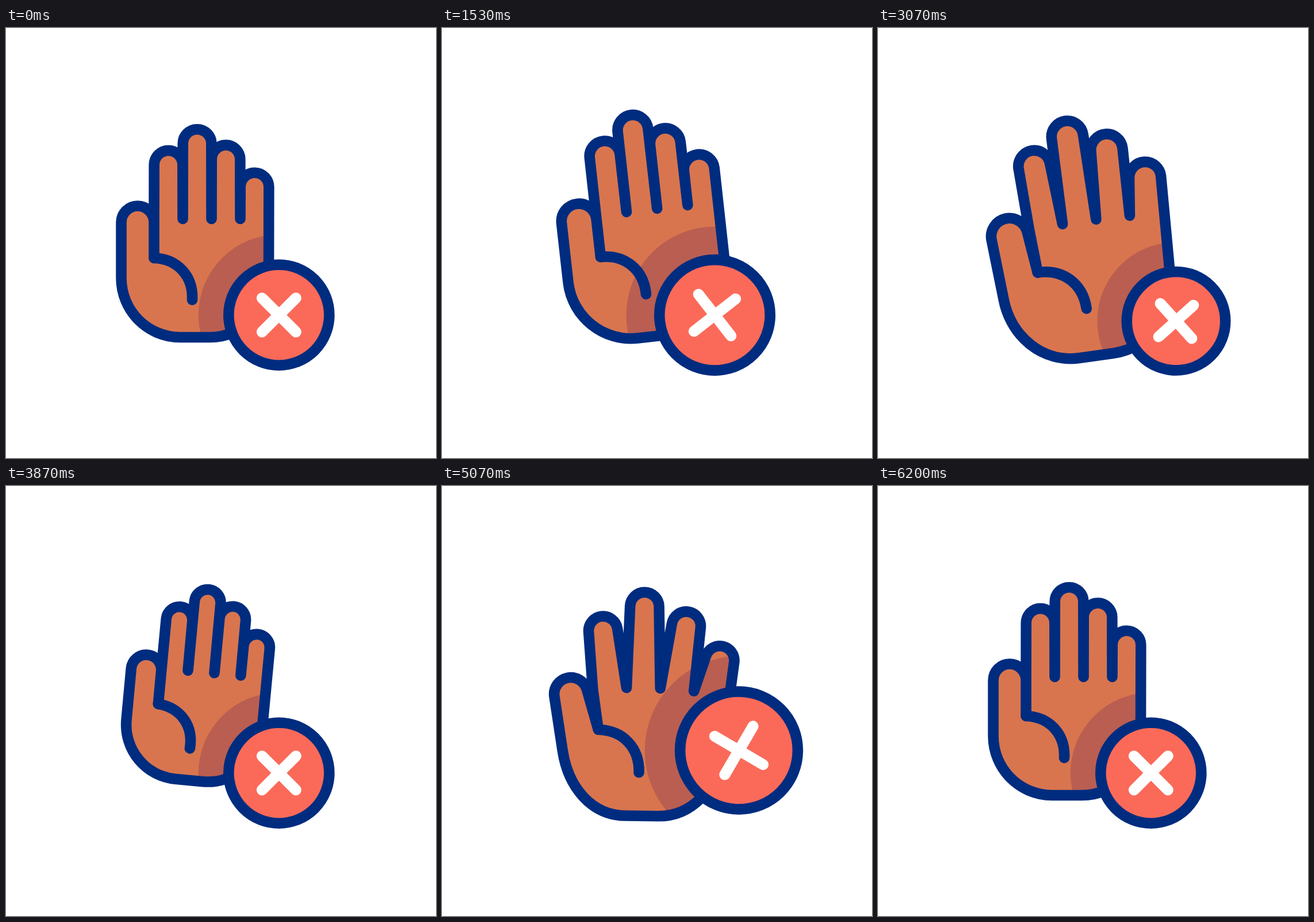
Write an HTML page that moves like this. It is 748 px wide and 748 px high and loops after 6270 ms.

```html
<!DOCTYPE html>
<html lang="en">
<head>
<meta charset="utf-8">
<title>Waving hand</title>
<style>
  html, body { margin: 0; width: 100%; height: 100%; overflow: hidden; background: #fff; }
  svg { display: block; width: 100vw; height: 100vh; }
  .line { fill: none; stroke: #002c7f; stroke-width: 18.6; stroke-linecap: round; stroke-linejoin: round; }
</style>
</head>
<body>
<svg viewBox="0 0 748 748">
  <clipPath id="palm"><path class="hand"/></clipPath>
  <path class="hand" fill="#d8754e"/>
  <circle id="shade" fill="#ba5e51" clip-path="url(#palm)"/>
  <path class="hand line"/>
  <path id="crease" class="line"/>
  <circle id="badge" class="line" style="fill:#fb6a59"/>
  <path id="cross" fill="none" stroke="#fff" stroke-width="19" stroke-linecap="round"/>
</svg>
<script>
const LOOP = 6270, CYCLE = LOOP / 3, FPS = 15, FRAMES = 94;

// Each pose: hand x, y, tilt, finger fan, size; badge x, y, size, turn.
const rest = [307.5, 332, 0, 0, 1, 474.8, 499.2, 1, 0];
const poses = [
  [0, rest],
  [330, [309, 358, 11, 9.5, 1.02, 494, 447, 1.07, -14]],
  [600, [312, 356, 8.4, 9, 1.03, 502, 450, 1.15, -14.3]],
  [887, [321, 351, 0.8, 7.3, 1.08, 516.5, 460, 1.17, -14.7]],
  [977, [321, 341, -8, 2.8, 1.14, 518.5, 509.7, 0.98, 3]],
  [1150, [312, 327, -9, 0.5, 1.1, 480, 509, 1.15, 11]],
  [1390, [311, 311, -8, 0, 1.09, 474.8, 500, 1.14, 9]],
  [1533, [321, 320, -6.4, 0, 1.07, 474.5, 499.4, 1.1, 7]],
  [1777, [316.5, 321, 5.3, 0, 0.922, ...rest.slice(5)]],
  [2020, rest],
  [CYCLE, rest]];

// Smooth interpolation that never overshoots a pose.
function poseAt(t) {
  const last = poses.length - 1;
  const i = Math.min(last, poses.findIndex(p => p[0] > t)) - 1;
  const [t0, from] = poses[i], [t1, to] = poses[i + 1];
  const h = t1 - t0, s = (t - t0) / h, r = 1 - s;
  return from.map((v, c) => {
    const slope = n => (poses[n + 1][1][c] - poses[n][1][c]) / (poses[n + 1][0] - poses[n][0]);
    const tangent = n => {
      if (n === 0 || n === last) return 0;
      const p = slope(n - 1), q = slope(n);
      return p * q <= 0 ? 0 : 2 * p * q / (p + q);
    };
    return v * r * r * (1 + 2 * s) + to[c] * s * s * (3 - 2 * s)
      + h * s * r * (tangent(i) * r - tangent(i + 1) * s);
  });
}

const add = (p, q, k = 1) => [p[0] + q[0] * k, p[1] + q[1] * k];
const sub = (p, q) => [p[0] - q[0], p[1] - q[1]];
const dist = (p, q) => Math.hypot(p[0] - q[0], p[1] - q[1]);
const unit = v => { const n = Math.hypot(...v); return [v[0] / n, v[1] / n]; };
const turn = ([x, y], deg) => {
  const a = deg * Math.PI / 180, c = Math.cos(a), s = Math.sin(a);
  return [x * c - y * s, x * s + y * c];
};
const str = (...pts) => pts.map(p => p.map(v => v.toFixed(2)).join(' ')).join(' ');

// Where a line from the base touches a round tip; side is 1 for left, -1 for right.
function touch(tip, r, base, side) {
  const a = Math.atan2(base[1] - tip[1], base[0] - tip[0])
    + side * Math.acos(Math.min(1, r / dist(tip, base)));
  return [tip[0] + r * Math.cos(a), tip[1] + r * Math.sin(a)];
}

// A quarter-turn curve, given its travel directions at both ends.
function bend(from, dirIn, to, dirOut, roundness = 0.39) {
  const k = roundness * dist(from, to);
  return 'C' + str(add(from, dirIn, k), add(to, dirOut, -k), to);
}

const FINGER_LENGTHS = [94, 131, 103.5, 55.5];

// Knuckles run in a chain from the valley right of the first finger.
function buildFingers(valley, tilt, fan, size) {
  const width = 50 * size * (1 + 0.012 * fan);
  const step = i => turn([width, 0], tilt + 0.55 * fan * i);
  let left = sub(valley, step(-1));
  return FINGER_LENGTHS.map((length, n) => {
    const i = n - 1, right = add(left, step(i));
    const middle = add(left, step(i), 0.5);
    const tip = add(middle, turn([0, -length * size], tilt + fan * i));
    const finger = { left, right, tip, r: 24.8 * size * (1 - 0.008 * fan) };
    left = right;
    return finger;
  });
}

function buildHand([x, y, tilt, fan, size]) {
  const place = (from, v, angle, k) => add(from, turn(v, angle), k);
  const crotch = place([x, y], [-50 * (1 - 0.015 * fan), 68], tilt, size);
  const palm = (px, py) => place(crotch, [px, py], tilt, size);
  const left = palm(-57, 35), bottomLeft = palm(45.5, 138);
  const bottomRight = palm(97.5, 138), right = palm(199.5, 35);
  const thumb = {
    left, right: crotch, r: 28.5 * size * (1 - 0.008 * fan),
    tip: place(crotch, [-28.5, -62], tilt - 1.9 * fan, size * (1 + 0.008 * fan))
  };
  const fingers = buildFingers([x, y], tilt, fan, size);
  fingers[3].right = right;

  const digit = ({ left, right, tip, r }) => 'L' + str(left, touch(tip, r, left, 1))
    + `A${r} ${r} 0 0 1 ` + str(touch(tip, r, right, -1)) + 'L' + str(right);
  const back = turn([-1, 0], tilt);
  const down = unit(sub(right, touch(fingers[3].tip, fingers[3].r, right, -1)));
  const up = unit(sub(touch(thumb.tip, thumb.r, left, 1), left));
  const outline = 'M' + str(left) + [thumb, ...fingers].map(digit).join('')
    + bend(right, down, bottomRight, back) + 'L' + str(bottomLeft)
    + bend(bottomLeft, back, left, up) + 'Z';

  const end = place(crotch, [66.5, 73], 1.3 * tilt - 0.3 * fan, (1 + size) / 2);
  const chord = unit(sub(end, crotch));
  const crease = 'M' + str(crotch) + bend(crotch, turn(chord, -45), end, turn(chord, 45), 0.42);
  return { outline, crease };
}

const hands = document.querySelectorAll('.hand');
const [shade, crease, badge, cross] =
  ['shade', 'crease', 'badge', 'cross'].map(id => document.getElementById(id));

function setCircle(el, [x, y], r) {
  el.setAttribute('cx', x);
  el.setAttribute('cy', y);
  el.setAttribute('r', r);
}

function draw(t) {
  const pose = poseAt(t), hand = buildHand(pose);
  hands.forEach(el => el.setAttribute('d', hand.outline));
  crease.setAttribute('d', hand.crease);

  const [x, y, size, angle] = pose.slice(5), center = [x, y];
  setCircle(shade, center, 140 * size);
  setCircle(badge, center, 87.5 * size);
  const bar = deg => {
    const arm = turn([41.7 * size, 0], deg);
    return 'M' + str(add(center, arm)) + 'L' + str(sub(center, arm));
  };
  cross.setAttribute('d', bar(angle + 45) + bar(angle - 45));
}

function tick() {
  const frame = Math.floor((performance.now() % LOOP + 4) * FPS / 1000) % FRAMES;
  draw(frame * 1000 / FPS % CYCLE);
  requestAnimationFrame(tick);
}
tick();
</script>
</body>
</html>
```
